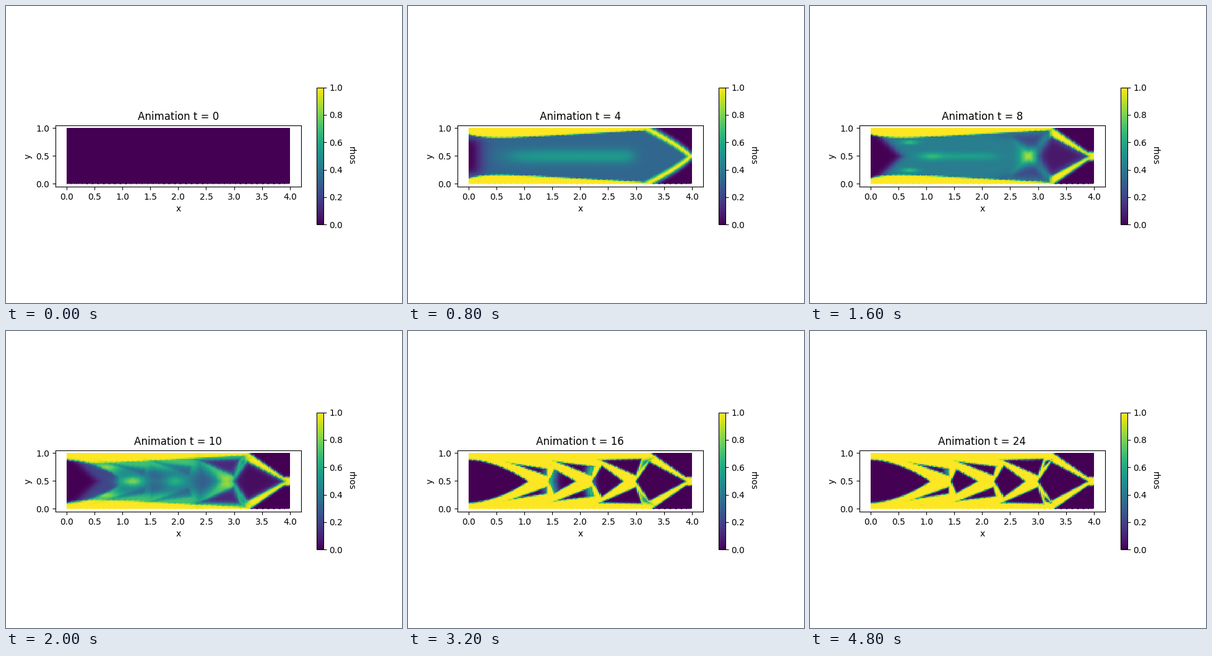
Recreate the animation shown at these times as a matplotlib script. Size 640 by 480 pixels, loop 5 s.

```python
import numpy as np
import matplotlib.pyplot as plt
from matplotlib.animation import FuncAnimation
from matplotlib.tri import Triangulation

NX, NY = 160, 40
FRAMES, INTERVAL = 25, 200
NOSES = [1.07, 1.92, 2.77, 3.9]  # where the open bays end on the mid line

# Triangle mesh of the 4 x 1 beam
gx, gy = np.meshgrid(np.linspace(0, 4, NX + 1), np.linspace(0, 1, NY + 1))
corner = (np.arange(NY)[:, None] * (NX + 1) + np.arange(NX)).ravel()
right, up = corner + 1, corner + NX + 1
cells = np.concatenate([np.c_[corner, right, up + 1], np.c_[corner, up + 1, up]])
tri = Triangulation(gx.ravel(), gy.ravel(), cells)
x = tri.x[cells].mean(axis=1)
y = tri.y[cells].mean(axis=1)
v = abs(y - 0.5)  # distance from the mid line


def step(d, w=.006):
    return 1 / (1 + np.exp(-np.clip(d / w, -40, 40)))


def between(lo, hi, w):
    return step(x - lo, w) * step(hi - x, w)


def glow(cx, cv, sx, sv):
    return np.exp(-((x - cx) / sx) ** 2 - ((v - cv) / sv) ** 2)


def convex(*points):
    """Signed distance to a convex outline, positive inside."""
    pts = np.array(points)
    mid = pts.mean(axis=0)
    sides = []
    for a, b in zip(pts, np.roll(pts, -1, axis=0)):
        normal = np.array([a[1] - b[1], b[0] - a[0]]) / np.hypot(*(b - a))
        normal *= np.sign(normal @ (mid - a))
        sides.append((x - a[0]) * normal[0] + (v - a[1]) * normal[1])
    return np.min(sides, axis=0)


def slit(i):
    nose = NOSES[i]
    return convex((nose - .25 - .075 * i, .31 + .035 * i),
                  (nose + .33, .22 + .045 * i ** 2),
                  (nose + .33 - .05 * i, .105))


def bay(i):
    nose, rise = NOSES[i], .21 + .07 * i
    return convex((nose + .37 - .07 * i, 0), (nose + .47, rise),
                  (NOSES[i + 1], 0), (nose + .47, -rise))


root = .385 * (1 - (x / NOSES[0]) ** 1.8) - v
tip = np.minimum(.82 * (v - .5 + .69 * (x - 3.28)), v - .075)
sliver = convex((3.11, .27), (3.23, .38), (3.14, .36))
slits = [slit(i) for i in range(3)]
bays = [bay(i) for i in range(3)]
flange = step(v - (.28 + .056 * x + .11 * np.exp(-x / .3)), .007)


def carve(*masks):
    return 1 - np.max(masks, axis=0)


def first_guess():
    bending, shear = (4 - x) * v, .36 * (1 - 4 * v ** 2)
    return np.hypot(bending, shear) + .6 * glow(4, 0, .15, .12)


def diffuse():
    web = .33 + .21 * np.exp(-(v / .13) ** 2) * step(x - .75, .15) * step(2.95 - x, .06)
    web *= 1 - np.exp(-(x / .26) ** 2 - (v / .34) ** 6)
    d = v - .61 * np.maximum(3.97 - x, 0) ** .8
    outside = step(d - .05, .02)
    bar = np.exp(-(d / np.where(d < 0, .09, .07)) ** 2)
    body = np.maximum(web, flange * step(3.4 - x, .04)) * (1 - outside)
    return np.maximum(body, bar)


def ribbed():
    web = .42 + .14 * np.exp(-(v / .07) ** 2) * between(.85, 2.25, .08)
    web += .12 * glow(1.1, 0, .18, .07) + .25 * glow(.7, .25, .16, .04)
    web *= 1 - step(.56 - x - 1.05 * v, .045)
    web *= 1 - .5 * step(slits[2], .035)
    web *= 1 - .85 * step(bays[2], .035)
    cross = np.exp(-((v - 1.1 * abs(x - 2.83)) / .1) ** 2) * step(.4 - v, .04)
    web += .1 * cross + .36 * glow(2.83, 0, .17, .13)
    bar = step(x - 3.2, .02) * step(-bays[2], .01)
    return np.max([web, flange, bar], axis=0) * step(-tip, .01)


def branching():
    rho = carve(step(root, .01) * step(.92 - x, .03), .85 * step(bays[1], .05),
                step(slits[2], .014), step(bays[2], .014), step(tip),
                .5 * step(sliver, .02),
                *[.55 * step(s, .014) for s in slits[:2]], .58 * step(bays[0], .04))
    rho *= 1 - .58 * step(.22 - v, .03) * between(.9, 2.3, .06)
    rho += .55 * glow(1.2, 0, .17, .1) + .38 * glow(1.92, 0, .17, .1)
    return rho


def joined():
    rho = carve(*[step(h) for h in (root, tip, *slits, *bays)], .7 * step(sliver, .015))
    for i, nose in enumerate(NOSES[:2]):
        ridge = nose + .37 - .13 * i + .2 * v
        streak = np.exp(-((x - ridge) / (.12 - .03 * i)) ** 2) * step(.29 - v, .015)
        rho = np.maximum(rho, .65 * streak)
    return rho


def truss(spread, side):
    """Finished truss with some grey left at the first slit and upper flange."""
    rho = carve(*[step(h) for h in (root, tip, sliver, *slits, *bays)])
    patch = .6 * glow(1.4, .18, .1 * spread, .08) * side
    band = .5 * glow(2.82, .39, .22 * spread, .018) * (y > .5)
    return np.max([rho, patch, band], axis=0)


KEYS = [0, 1, 4, 8, 12, 16, 20, 24]
FIELDS = [np.clip(field, 0, 1) for field in (
    np.zeros_like(x), first_guess(), diffuse(), ribbed(), branching(), joined(),
    truss(1, 1), truss(.75, y > .5))]


def density(t):
    k = min(np.searchsorted(KEYS, t, side="right") - 1, len(KEYS) - 2)
    s = (t - KEYS[k]) / (KEYS[k + 1] - KEYS[k])
    return (1 - s) * FIELDS[k] + s * FIELDS[k + 1]


fig, ax = plt.subplots(figsize=(6.4, 4.8), dpi=100)
mesh = ax.tripcolor(tri, facecolors=density(0), vmin=0, vmax=1, cmap="viridis")
ax.set_aspect("equal")
ax.set_xlim(-.2, 4.2)
ax.set_ylim(-.05, 1.05)
ax.set_xticks(np.arange(0, 4.1, .5))
ax.set_yticks([0, .5, 1])
ax.set_xlabel("x")
ax.set_ylabel("y")
title = ax.set_title("Animation t = 0")
colorbar = fig.colorbar(mesh, ax=ax, shrink=.6)
colorbar.set_label("rhos", rotation=270, labelpad=15)


def update(t):
    mesh.set_array(density(t))
    title.set_text(f"Animation t = {t}")
    return mesh, title


anim = FuncAnimation(fig, update, frames=FRAMES, interval=INTERVAL,
                     repeat=True, repeat_delay=0)
plt.show()
```
